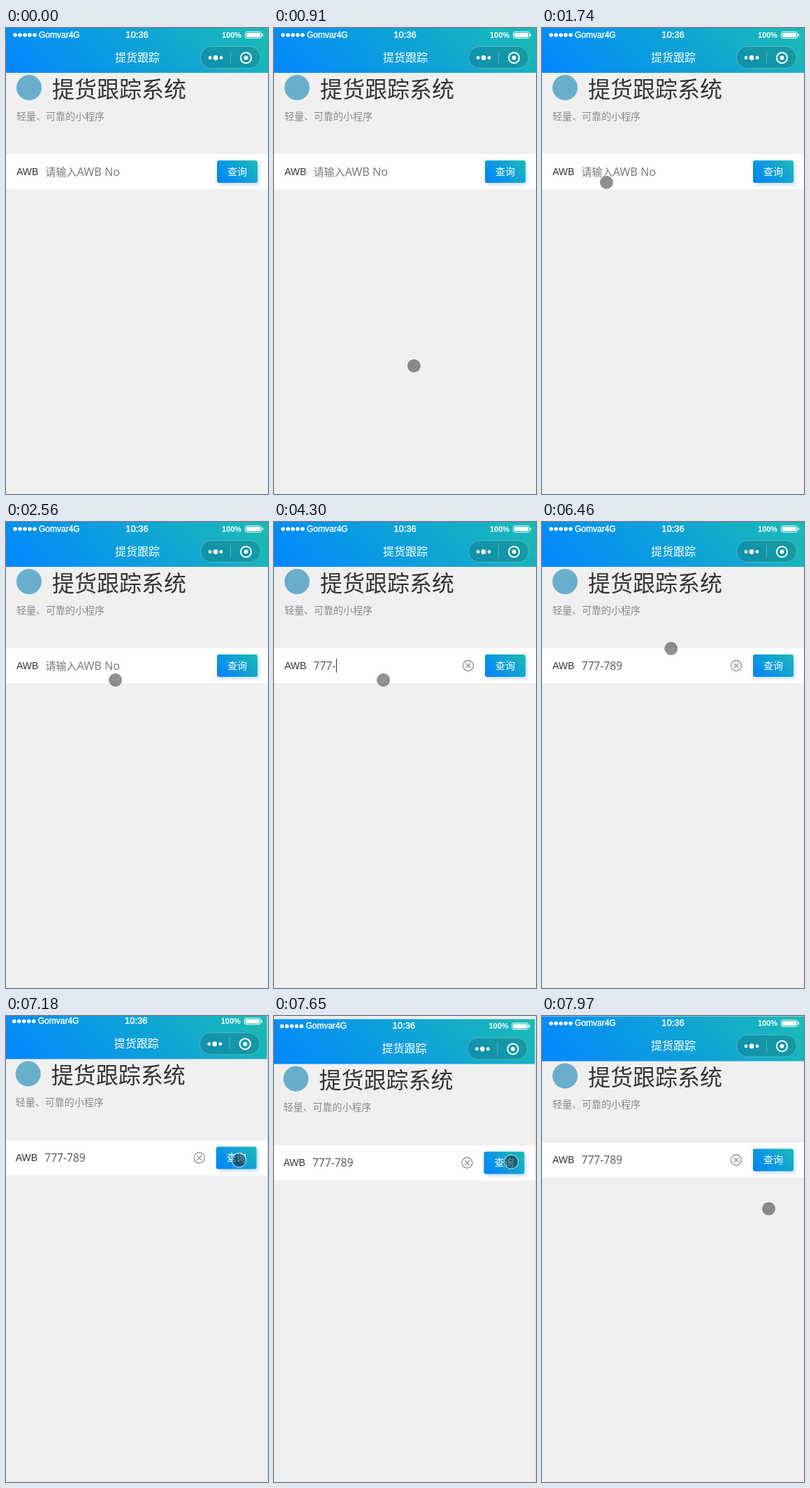
Animation, 375 px wide and 665 px high, one loop 7.99 s. Source, as an HTML page:

```html
<!DOCTYPE html>
<html lang="zh-CN">
<head>
<meta charset="utf-8">
<title>提货跟踪</title>
<style>
  html, body { margin: 0; width: 100%; height: 100%; overflow: hidden; background: #eee; }
  #stage { position: relative; width: 375px; height: 665px; overflow: hidden; }
  #page { position: absolute; inset: 0; background: #f0f0f0; box-shadow: 1px 0 #ddd; }
  #page > * { position: absolute; }
  .blue { background: linear-gradient(45deg, #0081ff, #1cbbb4); }
  .head { left: 0; top: 0; width: 375px; height: 64px;
    background: linear-gradient(45deg, #0086ff, #1cbbb4); }
  .bar { left: 0; top: 180px; width: 375px; height: 50px; background: #fff; }
  .button { left: 302px; top: 189px; width: 58px; height: 32px; border-radius: 3px;
    box-shadow: 3px 3px 4px rgba(0, 102, 204, .2); }
  svg { left: 0; top: 0; }
  text { font-family: "Open Sans", "Noto Sans CJK SC", "Noto Sans CJK", sans-serif; white-space: pre; }
  .cn { font-family: "Noto Sans CJK SC", "Noto Sans CJK", sans-serif; }
  .arial { font-family: "Liberation Sans", Arial, sans-serif; }
  .firm { stroke: #fff; stroke-width: .4px; }
  .mid { text-anchor: middle; }
  #cursor { position: absolute; left: -11px; top: -11px; width: 22px; height: 22px; border-radius: 50%;
    background: radial-gradient(circle, rgba(0, 0, 0, .43) 9px, rgba(255, 255, 255, .7) 9.8px,
      rgba(255, 255, 255, .5) 10.3px, transparent 11px); }
</style>
</head>
<body>
<div id="stage">
  <div id="page">
    <div class="head"></div>
    <div class="bar"></div>
    <div class="button blue"></div>
    <svg width="375" height="665" viewBox="0 0 375 665">
      <!-- status bar -->
      <g fill="#fff">
        <path d="M13 10h28.1" stroke="#fff" stroke-width="5.6" stroke-linecap="round" stroke-dasharray="0 7"/>
        <text class="arial firm" x="47" y="14" font-size="12">Gomvar4G</text>
        <text class="arial firm mid" x="187.5" y="14" font-size="13">10:36</text>
        <text class="arial" x="309" y="14" font-size="11" font-weight="700">100%</text>
        <rect x="342.5" y="5.5" width="23" height="9" rx="2" fill="none" stroke="#fff"/>
        <rect x="344" y="7" width="20" height="6" rx="1"/>
        <rect x="366.5" y="8" width="1.5" height="4" rx=".7"/>
        <text class="cn mid" x="188" y="48" font-size="16">提货跟踪</text>
      </g>
      <!-- capsule menu -->
      <rect x="278.5" y="26.5" width="86" height="31" rx="15.5" fill="#000" fill-opacity=".15"
        stroke="#fff" stroke-opacity=".25"/>
      <path d="M321.5 33v18" stroke="#fff" stroke-opacity=".25"/>
      <g fill="#fff">
        <circle cx="292" cy="42.5" r="2.4"/>
        <circle cx="300" cy="42.5" r="3.4"/>
        <circle cx="308" cy="42.5" r="2.4"/>
        <circle cx="343.5" cy="42.5" r="3"/>
        <circle cx="343.5" cy="42.5" r="7.6" fill="none" stroke="#fff" stroke-width="2"/>
      </g>
      <!-- intro -->
      <circle cx="33" cy="85" r="18" fill="#69aecb"/>
      <text class="cn" x="66" y="99" font-size="32" font-weight="300" fill="#333">提货跟踪系统</text>
      <text class="cn" x="15" y="131" font-size="14" fill="#888">轻量、可靠的小程序</text>
      <!-- search row -->
      <text class="arial" x="15" y="210" font-size="14" fill="#333">AWB</text>
      <text id="hint" x="56.5" y="211" font-size="15" fill="#777"><tspan class="cn">请输入</tspan><tspan font-size="16.3">AWB No</tspan></text>
      <text id="typed" x="56.5" y="211" font-size="15.6" fill="#555"></text>
      <rect id="caret" y="195" width="1" height="20" fill="#333"/>
      <g id="clear" fill="none" stroke="#909090" stroke-width="1.3">
        <circle cx="278" cy="205" r="7.5"/>
        <path d="M274.8 201.8l6.4 6.4m0-6.4l-6.4 6.4"/>
      </g>
      <text class="cn mid" x="331" y="210" font-size="14" font-weight="500" fill="#fff">查询</text>
    </svg>
  </div>
  <div id="cursor"></div>
</div>
<script>
  const LOOP = 7990;
  const $ = id => document.getElementById(id);

  // [time, x, y]
  const cursorPath = [
    [240, 291, 676], [910, 200.5, 482.5], [1030, 152.5, 396.5], [1740, 92.5, 220.5],
    [1830, 80, 201], [2040, 80, 201], [2540, 156.5, 225.5], [6310, 156.5, 225.5],
    [6460, 184.5, 180.5], [7050, 330, 205], [7650, 339.5, 208], [7760, 339.5, 209], [7970, 324.5, 275]
  ];
  const shakePath = [
    [7130, 0, 0], [7230, -2, -4], [7340, 2, 4], [7450, -2, -4], [7550, 1.5, -3],
    [7650, -1.6, 4.5], [7760, 1.5, -3], [7870, -1, 2], [7970, 0, .5], [7989, 0, 0]
  ];
  // [time, text, caret visible]
  const typing = [
    [0, '', 0], [2040, '', 1], [2560, '', 0], [3080, '', 1], [3580, '', 0],
    [3940, '7', 1], [4120, '77', 1], [4280, '777', 1], [4300, '777-', 1], [4810, '777-', 0],
    [5350, '777-7', 1], [5590, '777-78', 1], [5840, '777-789', 1],
    [6310, '777-789', 0], [6820, '777-789', 1], [7150, '777-789', 0]
  ];

  const slope = (p, i, k) => (p[i + 1][k] - p[i][k]) / (p[i + 1][0] - p[i][0]);

  function tangent(p, i, k) {
    if (i === 0) return slope(p, 0, k);
    if (i === p.length - 1) return slope(p, i - 1, k);
    const a = slope(p, i - 1, k), b = slope(p, i, k);
    return a * b > 0 ? 2 * a * b / (a + b) : 0;
  }

  // Monotone cubic through the points, held at both ends
  function along(p, t) {
    const last = p[p.length - 1];
    if (t <= p[0][0]) return p[0].slice(1);
    if (t >= last[0]) return last.slice(1);
    const i = p.findIndex(q => q[0] > t) - 1;
    const d = p[i + 1][0] - p[i][0], u = (t - p[i][0]) / d, v = 1 - u;
    return [1, 2].map(k =>
      v * v * (1 + 2 * u) * p[i][k] + u * u * (3 - 2 * u) * p[i + 1][k] +
      d * u * v * (v * tangent(p, i, k) - u * tangent(p, i + 1, k)));
  }

  function move(el, [x, y]) {
    el.style.transform = x || y ? `translate(${x}px, ${y}px)` : 'none';
  }

  function show(id, on) {
    $(id).style.visibility = on ? 'visible' : 'hidden';
  }

  function draw() {
    const t = performance.now() % LOOP;
    const [, text, caret] = typing.filter(s => s[0] <= t).pop();
    $('typed').textContent = text;
    $('caret').setAttribute('x', text ? Math.floor(57.3 + $('typed').getComputedTextLength()) : 56);
    show('caret', caret);
    show('hint', !text);
    show('clear', text);
    show('cursor', t >= 260);
    move($('cursor'), along(cursorPath, t));
    move($('page'), along(shakePath, t));
    requestAnimationFrame(draw);
  }
  draw();
</script>
</body>
</html>
```
